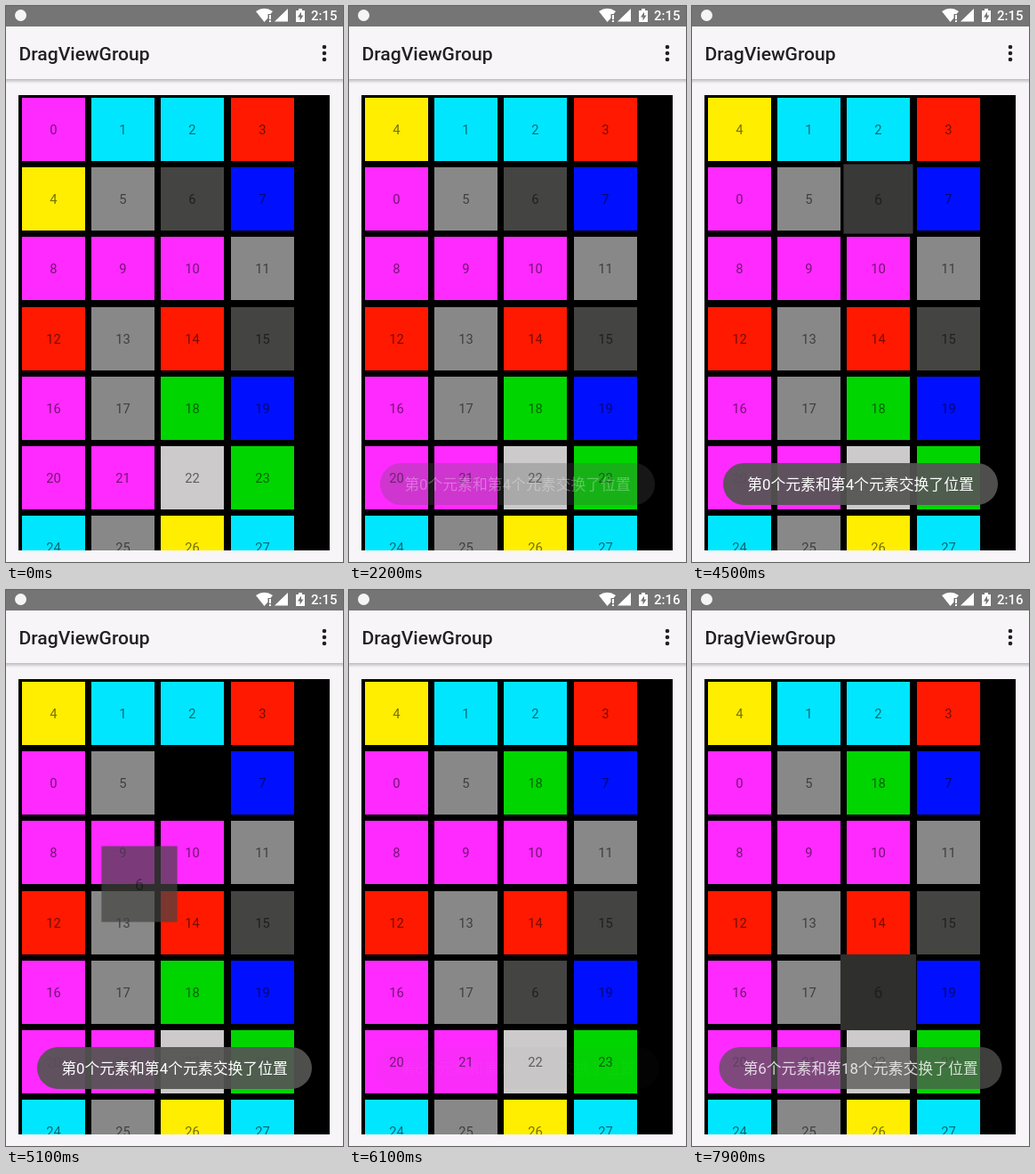
Recreate the animation shown at these times as an HTML page with a canvas. Size 379 px wide and 624 px high, loop 8 s.

```html
<!DOCTYPE html>
<html lang="zh-CN">
<head>
<meta charset="utf-8">
<title>DragViewGroup</title>
<style>
  html, body { margin: 0; width: 100%; height: 100%; overflow: hidden; background: #f7f5f8; }
  canvas { display: block; }
</style>
</head>
<body>
<canvas id="stage" width="379" height="624"></canvas>
<script>
const ctx = document.getElementById('stage').getContext('2d');
const LOOP = 8000, STEP = 100, TILE = 71, PITCH = 78.2;
const GRID = { x: 14, y: 100, w: 350, h: 511 };
const COLORS = {
  m: '#ff2aff', c: '#00e6ff', r: '#ff1900', y: '#ffee00', g: '#888888',
  d: '#444442', b: '#0010ff', v: '#00d500', l: '#cccaca'
};
const TILE_COLORS = 'mccrygdbmmmgrgrdmgvbmmlvcgyc';

// Finger paths: [time, centre x, centre y]
const DRAGS = [
  { tile: 0, path: [[900, 56, 150], [1000, 60, 210], [1100, 72.5, 296], [1250, 130, 569],
    [1400, 319, 420], [1500, 280, 89], [1600, 130, 130], [1700, 58, 212]] },
  { tile: 6, path: [[4900, 210, 217], [5000, 170, 250], [5150, 140, 370], [5300, 200, 501],
    [5450, 280, 470], [5600, 220.5, 439], [5700, 212, 450]] }
];

const clamp = v => Math.max(0, Math.min(1, v));
const ramp = (t, start, length) => clamp((t - start) / length);
const cellCenter = i => ({
  x: Math.round(18 + i % 4 * PITCH) + TILE / 2,
  y: Math.round(103 + Math.floor(i / 4) * PITCH) + TILE / 2
});

function along(path, t) {
  const i = Math.max(1, path.findIndex(p => p[0] >= t));
  const [a, b] = [path[i - 1], path[i]];
  const k = ramp(t, a[0], b[0] - a[0]);
  return { x: a[1] + (b[1] - a[1]) * k, y: a[2] + (b[2] - a[2]) * k };
}

function text(str, x, y, size, color, weight = 400, align = 'center') {
  ctx.font = `${weight} ${size}px Roboto, "Noto Sans CJK SC", "Noto Sans CJK", sans-serif`;
  ctx.textAlign = align;
  ctx.fillStyle = color;
  ctx.fillText(str, x, y);
}

function rect(x, y, w, h, color) {
  ctx.fillStyle = color;
  ctx.fillRect(x, y, w, h);
}

function circle(x, y, r, color) {
  ctx.fillStyle = color;
  ctx.beginPath();
  ctx.arc(x, y, r, 0, 7);
  ctx.fill();
}

function shape(path, color) {
  ctx.fillStyle = color;
  ctx.fill(new Path2D(path));
}

// lift runs from 0 (resting) to 1 (picked up: larger and translucent)
function drawTile(n, { x, y }, lift = 0) {
  ctx.save();
  ctx.translate(x, y);
  ctx.scale(1 + 0.2 * lift, 1 + 0.2 * lift);
  ctx.globalAlpha = 1 - 0.3 * lift;
  rect(-TILE / 2, -TILE / 2, TILE, TILE, COLORS[TILE_COLORS[n]]);
  text(n, 0, 5.5, 14.74, 'rgba(0,0,0,.54)');
  ctx.restore();
}

function drawStatusBar(t) {
  rect(0, 0, 379, 23, '#757575');
  circle(16.5, 10.5, 6.5, '#f5f5f5');
  shape('M281 6Q290.500 -0.500 300 6L297.500 9H294.500V13.500L290.500 18Z', '#fff');
  rect(296, 10, 2, 5, '#fff');
  rect(296, 16, 2, 2, '#fff');
  shape('M302 17.500L317 3V17.500Z', '#fff');
  shape('M326 5H329V3H333V5H336V18H326Z', '#fff');
  shape('M332 6.500L328 12.500H330.500V16.500L334.500 10.500H332Z', '#757575');
  text(t < 5700 ? '2:15' : '2:16', 372.5, 16, 15, '#fff', 500, 'right');
}

function drawToolbar() {
  const shadow = ctx.createLinearGradient(0, 82, 0, 87);
  shadow.addColorStop(0, '#bdbcbd');
  shadow.addColorStop(1, '#f7f5f8');
  rect(0, 82, 379, 5, shadow);
  text('DragViewGroup', 14.5, 61, 21.05, '#212121', 500, 'left');
  for (const y of [46, 53, 60]) circle(358, y, 2.3, '#212121');
}

function drawGrid(t) {
  const cells = [...TILE_COLORS].map((_, i) => i);
  const swap = (a, b) => { [cells[a], cells[b]] = [cells[b], cells[a]]; };
  if (t >= 1800) swap(0, 4);
  if (t >= 5800) swap(6, 18);

  const lifts = {
    0: ramp(t, 400, 200) - ramp(t, 2000, 200),
    6: ramp(t, 4400, 200) - ramp(t, 5800, 200) + ramp(t, 7500, 200)
  };
  const drag = DRAGS.find(({ path }) => t >= path[0][0] && t <= path.at(-1)[0]);

  ctx.save();
  ctx.beginPath();
  ctx.rect(GRID.x, GRID.y, GRID.w, GRID.h);
  ctx.clip();
  rect(GRID.x, GRID.y, GRID.w, GRID.h, '#000');
  cells.forEach((n, i) => { if (!lifts[n]) drawTile(n, cellCenter(i)); });
  cells.forEach((n, i) => {
    if (lifts[n] && drag?.tile !== n) drawTile(n, cellCenter(i), lifts[n]);
  });
  ctx.restore();
  if (drag) drawTile(drag.tile, along(drag.path, t), 1);
}

function drawToast(from, to, width, opacity) {
  if (opacity <= 0) return;
  ctx.save();
  ctx.globalAlpha = opacity;
  ctx.fillStyle = 'rgba(84,84,83,.93)';
  ctx.beginPath();
  ctx.roundRect(189.5 - width / 2, 513, width, 47, 23.5);
  ctx.fill();
  text(`第${from}个元素和第${to}个元素交换了位置`, 189.5, 543, 16.85, '#fff');
  ctx.restore();
}

function draw(t) {
  rect(0, 0, 379, 624, '#f7f5f8');
  drawStatusBar(t);
  drawToolbar();
  drawGrid(t);
  drawToast(0, 4, 309, ramp(t, 2050, 500) - ramp(t, 5700, 350));
  drawToast(6, 18, 318, ramp(t, 6080, 500) - 0.2 * ramp(t, 7600, 300));
}

function tick() {
  draw(Math.floor(performance.now() % LOOP / STEP) * STEP);
  requestAnimationFrame(tick);
}
tick();
</script>
</body>
</html>
```
